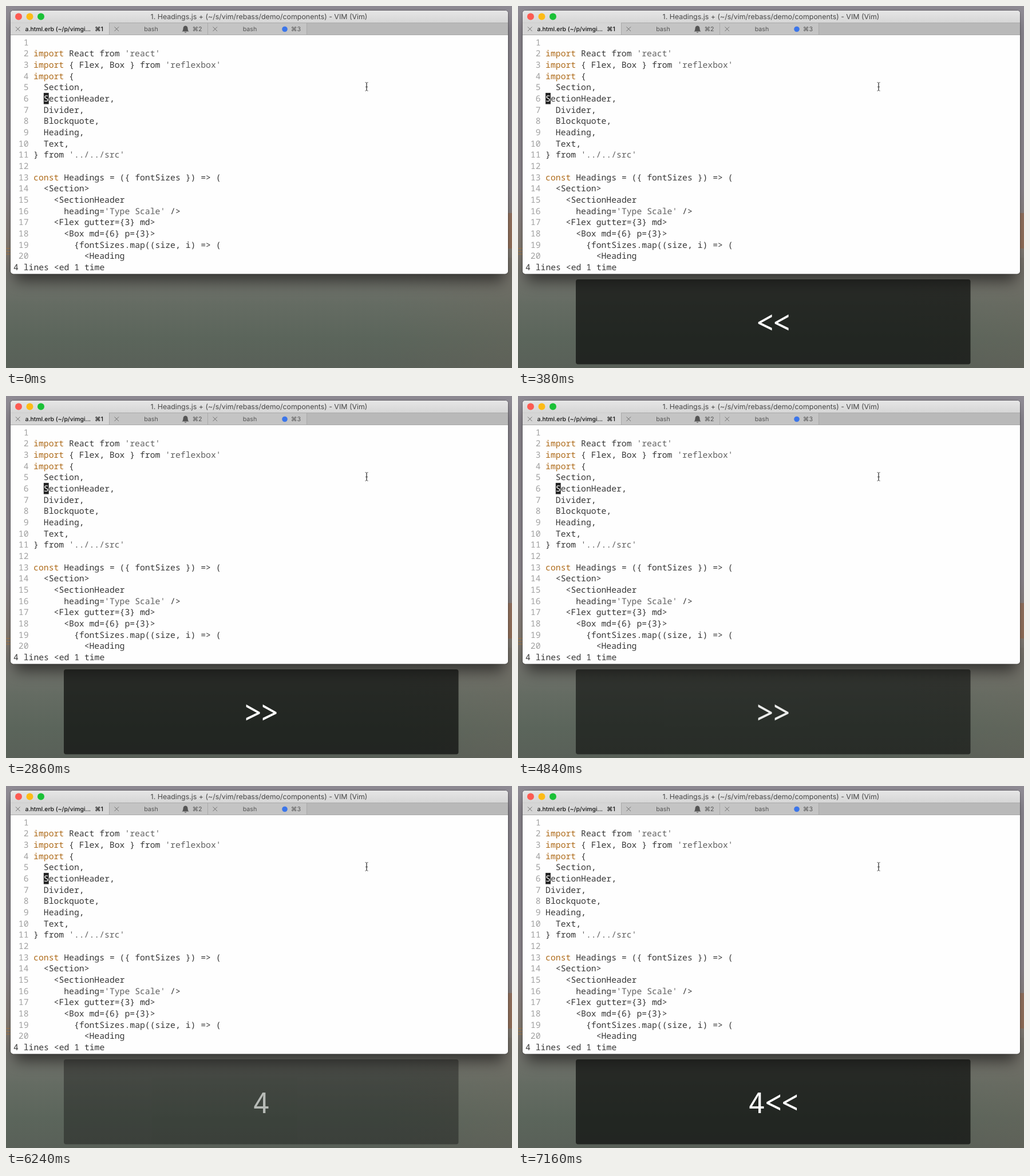
These frames come from a looping animation (884x633 px, 8000 ms). An HTML page:

```html
<!DOCTYPE html>
<html lang="en">
<head>
<meta charset="utf-8">
<title>Vim indent</title>
<style>
  html, body { margin: 0; width: 100%; height: 100%; overflow: hidden; background: #5b625a; }
  svg { display: block; width: 884px; height: 633px; }
  text { white-space: pre; text-rendering: geometricPrecision; }
  .code text { font: 14.76px "Noto Sans Mono", monospace; fill: #363636; }
  .code .num { fill: #a0a0a0; }
  .key { fill: #ae6a18; }
  .str { fill: #606060; }
  .inv { fill: #fff; }
  .ui { font-family: Inter, sans-serif; font-size: 10.7px; fill: #555; }
  .front { font-weight: 500; fill: #111; }
  .mid { text-anchor: middle; }
  #keys { font: 50px "Noto Sans Mono", monospace; fill: #fff; text-anchor: middle; }
  #keys .angle { font-size: 57px; }
</style>
</head>
<body>
<svg viewBox="0 0 884 633">
  <defs>
    <linearGradient id="sky" x2="0" y2="1">
      <stop offset="0" stop-color="#8f8b94"/>
      <stop offset=".5" stop-color="#918b92"/>
      <stop offset=".66" stop-color="#8a8178"/>
      <stop offset=".74" stop-color="#73736d"/>
      <stop offset=".82" stop-color="#656c63"/>
      <stop offset=".92" stop-color="#5b655b"/>
      <stop offset="1" stop-color="#596058"/>
    </linearGradient>
    <linearGradient id="warm">
      <stop offset=".75" stop-color="#75665a" stop-opacity="0"/>
      <stop offset="1" stop-color="#75665a" stop-opacity=".2"/>
    </linearGradient>
    <linearGradient id="bar" x2="0" y2="1">
      <stop offset="0" stop-color="#e6e6e6"/>
      <stop offset="1" stop-color="#d5d5d5"/>
    </linearGradient>
    <filter id="blur" x="-10%" y="-15%" width="120%" height="130%">
      <feGaussianBlur stdDeviation="13"/>
    </filter>
    <clipPath id="frame"><rect x="8" y="8" width="869" height="460.5" rx="5"/></clipPath>
  </defs>

  <rect width="884" height="633" fill="url(#sky)"/>
  <rect y="440" width="884" height="193" fill="url(#warm)"/>
  <path d="M0 424h8M0 429h8M0 434h8" stroke="#b3834f" stroke-width="1.5" opacity=".7"/>
  <rect x="877" y="362" width="7" height="62" fill="#a06c4c" opacity=".6"/>
  <rect x="14" y="24" width="857" height="457" rx="8" opacity=".55" filter="url(#blur)"/>
  <rect x="7.5" y="7.5" width="870" height="461.5" rx="5.5" fill="none" stroke="#000" stroke-opacity=".25"/>

  <g clip-path="url(#frame)">
    <rect x="8" y="8" width="869" height="461" fill="#fefefe"/>
    <rect x="8" y="8" width="869" height="22" fill="url(#bar)"/>
    <rect x="8" y="29.5" width="869" height="21.5" fill="#b9b9b9"/>
    <rect x="8" y="29.5" width="172" height="21.5" fill="#d6d6d6"/>
    <rect x="180" y="29.5" width="345" height="21.5" fill="#c4c4c4"/>
    <path d="M180 29.5H877M180.5 30V51M352.5 30V51M525.5 30V51M8 50.5H877" stroke="#aaa" fill="none"/>
  </g>
  <circle cx="22" cy="18.5" r="6" fill="#fc5b53"/>
  <circle cx="41.5" cy="18.5" r="6" fill="#fdbb17"/>
  <circle cx="61" cy="18.5" r="6" fill="#1bc137"/>
  <text class="ui mid" x="442" y="23.3" style="font-size:12.4px;fill:#484848">1. Headings.js + (~/s/vim/rebass/demo/components) - VIM (Vim)</text>
  <path d="M17 36.5l7.5 7.5m0-7.5l-7.5 7.5M189.5 36.5l7.5 7.5m0-7.5l-7.5 7.5M361.5 36.5l7.5 7.5m0-7.5l-7.5 7.5" stroke="#707070"/>
  <text class="ui front" x="33.5" y="44.2" style="font-size:10.4px">a.html.erb (~/p/vimgi...</text>
  <text class="ui front mid" x="162.5" y="44.2">⌘1</text>
  <text class="ui mid" x="253.5" y="44.2">bash</text>
  <text class="ui mid" x="334" y="44.2">⌘2</text>
  <text class="ui mid" x="426" y="44.2">bash</text>
  <text class="ui mid" x="506.5" y="44.2">⌘3</text>
  <path d="M307.5 44.5q2-1.5 2-5c0-3 1.5-4.5 4-5c2.5 .5 4 2 4 5q0 3.5 2 5zM311.500 45.500h4q-2 2.500-4 0z" fill="#555"/>
  <circle cx="487" cy="40.5" r="4.8" fill="#3c76ea"/>

  <g class="code" id="code"></g>
  <path d="M627.5 133.5q2.500 0 2.500 2v11q0 2-2.500 2M632.500 133.500q-2.500 0-2.500 2v11q0 2 2.500 2M628 141.500h4" fill="none" stroke="#444" stroke-width=".9"/>

  <g id="panel" opacity="0">
    <rect x="101" y="478" width="689.5" height="148.5" rx="4" fill="#080a08" fill-opacity=".68"/>
    <g id="keys"></g>
  </g>
</svg>
<script>
const LINES = `
import React from 'react'
import { Flex, Box } from 'reflexbox'
import {
  Section,
  SectionHeader,
  Divider,
  Blockquote,
  Heading,
  Text,
} from '../../src'

const Headings = ({ fontSizes }) => (
  <Section>
    <SectionHeader
      heading='Type Scale' />
    <Flex gutter={3} md>
      <Box md={6} p={3}>
        {fontSizes.map((size, i) => (
          <Heading`.split('\n');

const COL = 8.856, ROW = 19.68, LEFT = 13, TOP = 53.5;
const CODE_X = LEFT + 4 * COL - .3;
const CURSOR = 6, INDENT = 2 * COL;
const KEY_X = 446, KEY_W = 29;

// start ms, panel opacity, keys shown, lines shifted left
const STEPS = [
  [0, 0, '', 0],
  [80, .5, '<', 0],
  [260, 1, '<', 0],
  [380, 1, '<<', 1],
  [2300, .92, '<<', 1],
  [2390, .75, '<<', 1],
  [2510, 1, '>', 1],
  [2750, 1, '>>', 1],
  [2860, 1, '>>', 0],
  [4840, .87, '>>', 0],
  [4960, .65, '>>', 0],
  [5080, .42, '>>', 0],
  [5200, .2, '>>', 0],
  [5310, 0, '', 0],
  [6240, .55, '4', 0],
  [6360, 1, '4', 0],
  [6920, 1, '4<', 0],
  [7160, 1, '4<<', 4]
];
const LOOP = 8000;

const $ = id => document.getElementById(id);

function add(parent, tag, attrs, content = '') {
  const el = document.createElementNS('http://www.w3.org/2000/svg', tag);
  for (const name in attrs) el.setAttribute(name, attrs[name]);
  el.textContent = content;
  return parent.appendChild(el);
}

function addCode(parent, line, y, hasCursor) {
  const body = line.trimStart();
  const x = CODE_X + (line.length - body.length) * COL;
  if (hasCursor) add(parent, 'rect', { x, y: y - 15, width: COL, height: ROW, fill: '#222' });
  const text = add(parent, 'text', { x, y });
  const parts = hasCursor ? [body[0], body.slice(1)] : body.split(/(\bimport\b|\bconst\b|'[^']*')/);
  parts.forEach((part, i) => {
    if (!part) return;
    const kind = hasCursor ? (i ? '' : 'inv')
      : i % 2 === 0 ? '' : part[0] === "'" ? 'str' : 'key';
    add(text, 'tspan', { class: kind }, part);
  });
}

const rows = LINES.map((line, i) => {
  const n = i + 1, y = TOP + i * ROW + 15;
  add($('code'), 'text', { class: 'num', x: LEFT, y }, String(n).padStart(3));
  const row = add($('code'), 'g', {});
  addCode(row, line, y, n === CURSOR);
  return row;
});
add($('code'), 'text', { x: LEFT, y: TOP + 20 * ROW + 15 }, '4 lines <ed 1 time');

// each key is centred in its own cell
function showKeys(keys) {
  $('keys').replaceChildren();
  [...keys].forEach((key, i) => {
    const x = KEY_X + (i - (keys.length - 1) / 2) * KEY_W;
    const isAngle = key !== '4';
    add($('keys'), 'text', { x, y: isAngle ? 573.5 : 571.5, class: isAngle ? 'angle' : '' }, key);
  });
}

let shown = null;

function draw(t) {
  const step = STEPS.findLast(s => s[0] <= t);
  if (step === shown) return;
  shown = step;
  const [, opacity, keys, shifted] = step;
  $('panel').setAttribute('opacity', opacity);
  showKeys(keys);
  for (let i = 0; i < 4; i++) {
    const dx = i < shifted ? -INDENT : 0;
    rows[CURSOR - 1 + i].setAttribute('transform', `translate(${dx} 0)`);
  }
}

const start = performance.now();
function tick() {
  draw((performance.now() - start) % LOOP);
  requestAnimationFrame(tick);
}
tick();
</script>
</body>
</html>
```
